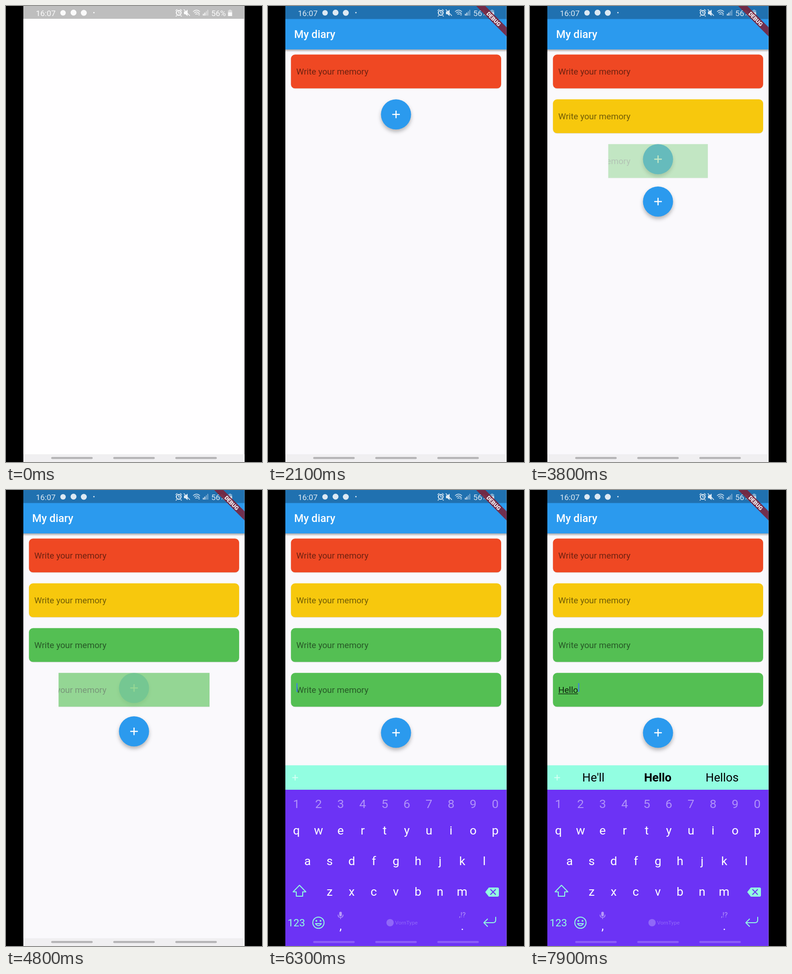
An HTML page that plays this animation: 561x998 px, repeating every 8 s.

```html
<!DOCTYPE html>
<html lang="en">
<head>
<meta charset="utf-8">
<title>My diary</title>
<style>
  html, body { margin: 0; width: 100%; height: 100%; overflow: hidden; background: #000; }
  svg { display: block; width: 561px; height: 998px; font-family: Roboto, "Liberation Sans", sans-serif; }
  .mid { text-anchor: middle; }
  .hint { font-size: 18.8px; fill: #000; fill-opacity: .54; }
  .line { fill: none; stroke-linecap: round; stroke-linejoin: round; }
  .fab { filter: drop-shadow(0 5px 4px rgba(0, 0, 0, .28)); }
  .key { font-size: 26.5px; fill: #fff; }
</style>
</head>
<body>
<svg id="stage" viewBox="0 0 561 998">
  <defs>
    <clipPath id="screen"><rect x="38" width="484.7" height="998"/></clipPath>
    <clipPath id="hintClip"><rect id="hintEdge" x="0" y="390" width="561" height="100"/></clipPath>
    <linearGradient id="shade" x2="0" y2="1">
      <stop stop-color="#000" stop-opacity=".38"/><stop offset="1" stop-color="#000" stop-opacity="0"/>
    </linearGradient>
    <radialGradient id="glow">
      <stop offset=".72" stop-color="#fff" stop-opacity=".62"/>
      <stop offset=".86" stop-color="#fff" stop-opacity=".45"/>
      <stop offset="1" stop-color="#fff" stop-opacity="0"/>
    </radialGradient>
  </defs>
  <rect width="561" height="998"/>
  <g clip-path="url(#screen)">
    <rect x="38" width="485" height="998" fill="#fffeff"/>
    <rect x="38" width="485" height="28" fill="#bebebe"/>

    <g id="app">
      <rect x="38" width="485" height="998" fill="#faf9fc"/>
      <rect x="38" y="94" width="485" height="7" fill="url(#shade)"/>
      <rect x="38" y="28" width="485" height="67" fill="#2b9aee"/>
      <rect x="38" width="485" height="28.5" fill="#2071b0"/>
      <text x="57.3" y="70.3" font-size="23.6" font-weight="500" fill="#fff">My diary</text>
      <g id="list"></g>
    </g>

    <g id="status" fill="#fff" stroke="none">
      <text x="65.5" y="22" font-size="17.4">16:07</text>
      <circle cx="125" cy="15" r="6"/><circle cx="148" cy="14.5" r="6.5"/><circle cx="170.5" cy="15" r="6.5"/>
      <circle cx="192.7" cy="14.5" r="1.5"/>
      <circle cx="378.5" cy="15" r="5.2" fill="none" stroke="#fff" stroke-width="2.2"/>
      <path class="line" d="M372 10l3-2.5M385 10l-3-2.5M374 21l-1.5 1.5M383 21l1.500 1.500M378.500 12v3.500h2.500" stroke="#fff" stroke-width="1.6"/>
      <path d="M390 12h3l5-4v14l-5-4h-3z"/>
      <path class="line" d="M390 8l12.500 13" stroke="#fff" stroke-width="1.700"/>
      <path class="line" d="M410.500 12q7-6 14 0M413 15q4.500-4 9 0M415.500 18q2-2 4 0" stroke="#fff" stroke-width="1.600"/>
      <path d="M421 17l2-2.500 2 2.500zM421 18.500l2 2.500 2-2.500z"/>
      <path d="M431.500 17h2v4h-2zM434.700 14.500h2v6.500h-2z"/>
      <path d="M438 11.500h2v9.500h-2zM441.200 8.500h2v12.500h-2z" opacity=".5"/>
      <text x="449.700" y="22" font-size="17.400">56%</text>
      <path d="M489 8h4v1.500h2.500V15H486.500V9.500H489z" opacity=".5"/><path d="M486.500 14h9v8h-9z"/>
    </g>

    <g id="banner" transform="translate(494.500 28.300) rotate(45)">
      <rect x="-60" y="-7.100" width="120" height="14.200" fill="#7c2038" fill-opacity=".88"/>
      <text class="mid" y="4.300" font-size="12" font-weight="900" fill="#fff">DEBUG</text>
    </g>

    <rect x="38" y="981" width="485" height="17" fill="#f0eff1"/>
    <g id="nav" fill="#b5b4b6"></g>

    <g id="board">
      <rect x="38" y="602.500" width="485" height="54" fill="#92fee1"/>
      <rect x="38" y="656" width="485" height="342" fill="#6c33f5"/>
      <path class="line" d="M54 629.500h11M59.500 624v11" stroke="#d5fff4" stroke-width="2"/>
      <g id="words" font-size="25.700"></g>
      <g id="keys"></g>
      <g class="line" stroke="#92fee1" stroke-width="2">
        <path d="M69 865l14 14.500h-7v9.500h-14v-9.500h-7z"/>
        <circle cx="110.500" cy="947" r="12.300"/>
        <path d="M104 949q6.500 9 13 0z"/>
        <path d="M499 935v6q0 6-6 6h-20M481 939l-8 8 8 8"/>
      </g>
      <circle cx="106" cy="943" r="1.900" fill="#92fee1"/><circle cx="115" cy="943" r="1.900" fill="#92fee1"/>
      <path d="M476 880l8-10h19q3 0 3 3v14q0 3-3 3h-19z" fill="#92fee1"/>
      <path class="line" d="M488 874.500l10.500 10.500M498.500 874.500l-10.500 10.500" stroke="#6c33f5" stroke-width="2.200"/>
      <text x="43" y="955" font-size="22.700" fill="#92fee1">123</text>
      <g fill="#b79af9">
        <rect x="156.200" y="923" width="5.600" height="10" rx="2.800"/>
        <path class="line" d="M153.500 930q0 5.500 5.500 5.500t5.500-5.500M159 935.500v3" stroke="#b79af9" stroke-width="1.500" style="fill:none"/>
        <text class="mid" x="426" y="935" font-size="15.500">,!?</text>
      </g>
      <text class="key mid" x="159" y="963">,</text>
      <text class="key mid" x="426" y="963">.</text>
      <circle cx="267.500" cy="947" r="8" fill="#9068f8"/>
      <text x="278.500" y="951" font-size="11.800" fill="#9068f8">VornType</text>
      <g id="boardNav" fill="#8c5df7"></g>
      <g id="popup">
        <rect x="-26.500" y="-98" width="54" height="129" rx="4" fill="#5126ba"/>
        <text class="mid" y="-50" font-size="30" fill="#fff"></text>
      </g>
    </g>
    <g id="dots"></g>
  </g>
</svg>
<script>
const LOOP = 8000, APP_AT = 100, GROW = 500;
const COLORS = ['#ef4823', '#f7c80d', '#54bf53', '#54bf53'];
const STARTS = [1500, 2600, 3635, 4495];
const FOCUS_AT = 5860, BOARD_AT = 6000, HOLD = 90;
// key, press time, finger offset from the key centre
const TAPS = [
  ['h', 6600, -4, 6], ['e', 6860, -9, 11], ['l', 6960, 9, 0], ['l', 7230, 8, 1], ['o', 7460, 6, 5]
];
const TEXT = 'Hello';
const WORDS = [
  ['', '', ''], ['Hej', 'H', 'He'], ['Hej', 'He', 'He is'], ['Help', 'Hel', 'Hello'],
  ['He\'ll', 'Hell', 'Hello'], ['He\'ll', 'Hello', 'Hellos']
];

const $ = id => document.getElementById(id);
const clamp = v => Math.max(0, Math.min(1, v));
const show = (node, on) => node.setAttribute('visibility', on ? 'inherit' : 'hidden');

function add(parent, tag, attrs = {}, text) {
  const node = document.createElementNS('http://www.w3.org/2000/svg', tag);
  for (const k in attrs) node.setAttribute(k, attrs[k]);
  if (text !== undefined) node.textContent = text;
  parent.appendChild(node);
  return node;
}

for (const id of ['nav', 'boardNav'])
  for (let i = 0; i < 3; i++)
    add($(id), 'rect', { x: 99 + 136 * i, y: 987, width: 91, height: 4.4, rx: 2.2 });

// Entries and add buttons
const slotY = i => 106.3 + 98 * i;
const fields = COLORS.map((fill, i) => {
  const y = slotY(i), clip = add(document.querySelector('defs'), 'clipPath', { id: 'grow' + i });
  const edge = add(clip, 'rect', { y: y - 0.3, height: 76 });
  const g = add($('list'), 'g', { 'clip-path': `url(#grow${i})` });
  add(g, 'rect', { x: 50.3, y: y + 1, width: 460.6, height: 74, rx: 9, fill: '#000', opacity: 0.12 });
  add(g, 'rect', { x: 50.3, y, width: 460.6, height: 74, rx: 9, fill });
  const hint = add(g, 'text', { class: 'hint', x: 62, y: y + 43.3 }, 'Write your memory');
  return { g, edge, hint };
});
const buttons = [0, 1, 2, 3, 4].map(() => {
  const g = document.createElementNS('http://www.w3.org/2000/svg', 'g');
  $('list').insertBefore(g, $('list').firstChild);
  add(g, 'circle', { class: 'fab', cx: 280.5, cy: 33, r: 33, fill: '#2b9aee' });
  add(g, 'path', { d: 'M272.300 33h16.600M280.600 24.700v16.600', stroke: '#fff', 'stroke-width': 2.5 });
  return g;
});

const last = fields[3];
last.hint.setAttribute('clip-path', 'url(#hintClip)');
const typed = add(last.g, 'text', { x: 62, y: slotY(3) + 43.3, 'font-size': 18.8, fill: '#0d1f0d' });
const underline = add(last.g, 'rect', { x: 62, y: slotY(3) + 45.3, height: 1.3, fill: '#0d1f0d' });
const caret = add(last.g, 'rect', { y: slotY(3) + 22.5, width: 2.4, height: 19, fill: '#3f83e0' });

// Keyboard
const keyPos = {};
[['1234567890', 62.3, 696], ['qwertyuiop', 62.3, 754], ['asdfghjkl', 86.8, 821], ['zxcvbnm', 135, 888]]
  .forEach(([row, x0, y], r) => [...row].forEach((c, i) => {
    const x = x0 + 48.4 * i;
    keyPos[c] = [x, y - 9];
    const node = add($('keys'), 'text', { class: 'key mid', x, y }, c);
    if (!r) node.style.fill = '#b092f9';
  }));
const words = [139, 280, 421].map((x, i) =>
  add($('words'), 'text', { class: 'mid', x, y: 638, 'font-weight': i === 1 ? 700 : 400 }));

// Finger marks: x, y, press time, hold time
const touches = [
  ...STARTS.map((s, i) => [283, slotY(i) + 40, s - 130, 100]),
  [290, slotY(3) + 40, FOCUS_AT - 130, 60],
  ...TAPS.map(([c, s, dx, dy]) => [keyPos[c][0] + dx, keyPos[c][1] + dy, s, HOLD])
];
const dots = touches.map(([cx, cy]) => add($('dots'), 'circle', { cx, cy, r: 15.5, fill: 'url(#glow)' }));

function drawList(t) {
  const p = STARTS.map(s => clamp((t - s) / GROW));
  fields.forEach(({ g, edge }, i) => {
    const w = 462 * Math.pow(p[i], 0.68);
    edge.setAttribute('x', 280.6 - w / 2);
    edge.setAttribute('width', w);
    g.setAttribute('opacity', p[i]);
  });
  buttons.forEach((b, i) => {
    const y = i ? slotY(i - 1) + 90 + 8 * p[i - 1] : slotY(0);
    b.setAttribute('transform', `translate(0 ${y - 2 * (i === 4 ? p[3] : 0) + (i === 4 ? 2 * p[3] : 0)})`);
    b.setAttribute('opacity', i < 4 ? 1 - p[i] : 1);
    show(b, t >= APP_AT && (!i || t >= STARTS[i - 1]) && (i === 4 || p[i] < 1));
  });
}

function drawEntry(t) {
  const n = TAPS.filter(k => t >= k[1] + HOLD).length;
  const first = TAPS[0][1] + HOLD;
  typed.textContent = TEXT.slice(0, n);
  const w = n ? typed.getComputedTextLength() : 0;
  underline.setAttribute('width', w);
  caret.setAttribute('x', 62.3 + w);
  const blink = n || (t - FOCUS_AT) % 1000 < 500;
  show(caret, t >= FOCUS_AT && blink && t >= APP_AT);
  $('hintEdge').setAttribute('x', n ? 66 + w : 0);
  last.hint.setAttribute('opacity', n ? clamp(1 - (t - first) / 390) : 1);
  words.forEach((node, i) => { node.textContent = WORDS[n][i]; });
}

function drawBoard(t) {
  const up = clamp((t - BOARD_AT) / 260);
  show($('board'), t >= BOARD_AT);
  $('board').setAttribute('transform', `translate(0 ${396 * Math.pow(1 - up, 3)})`);
  const hit = TAPS.find(k => t >= k[1] && t < k[1] + HOLD);
  show($('popup'), hit);
  if (hit) {
    const [x, y] = keyPos[hit[0]];
    $('popup').setAttribute('transform', `translate(${x} ${y})`);
    $('popup').lastElementChild.textContent = hit[0];
  }
}

function draw(t) {
  const open = t >= APP_AT;
  show($('app'), open);
  show($('banner'), open);
  $('status').setAttribute('opacity', open ? 0.85 : 0.95);
  drawList(t);
  drawEntry(t);
  drawBoard(t);
  dots.forEach((dot, i) => {
    const [, , s, hold] = touches[i];
    dot.setAttribute('opacity', t < s ? 0 : clamp(1 - (t - s - hold) / 120));
  });
}

const begin = performance.now();
function tick() {
  draw((performance.now() - begin) % LOOP);
  requestAnimationFrame(tick);
}
tick();
</script>
</body>
</html>
```
